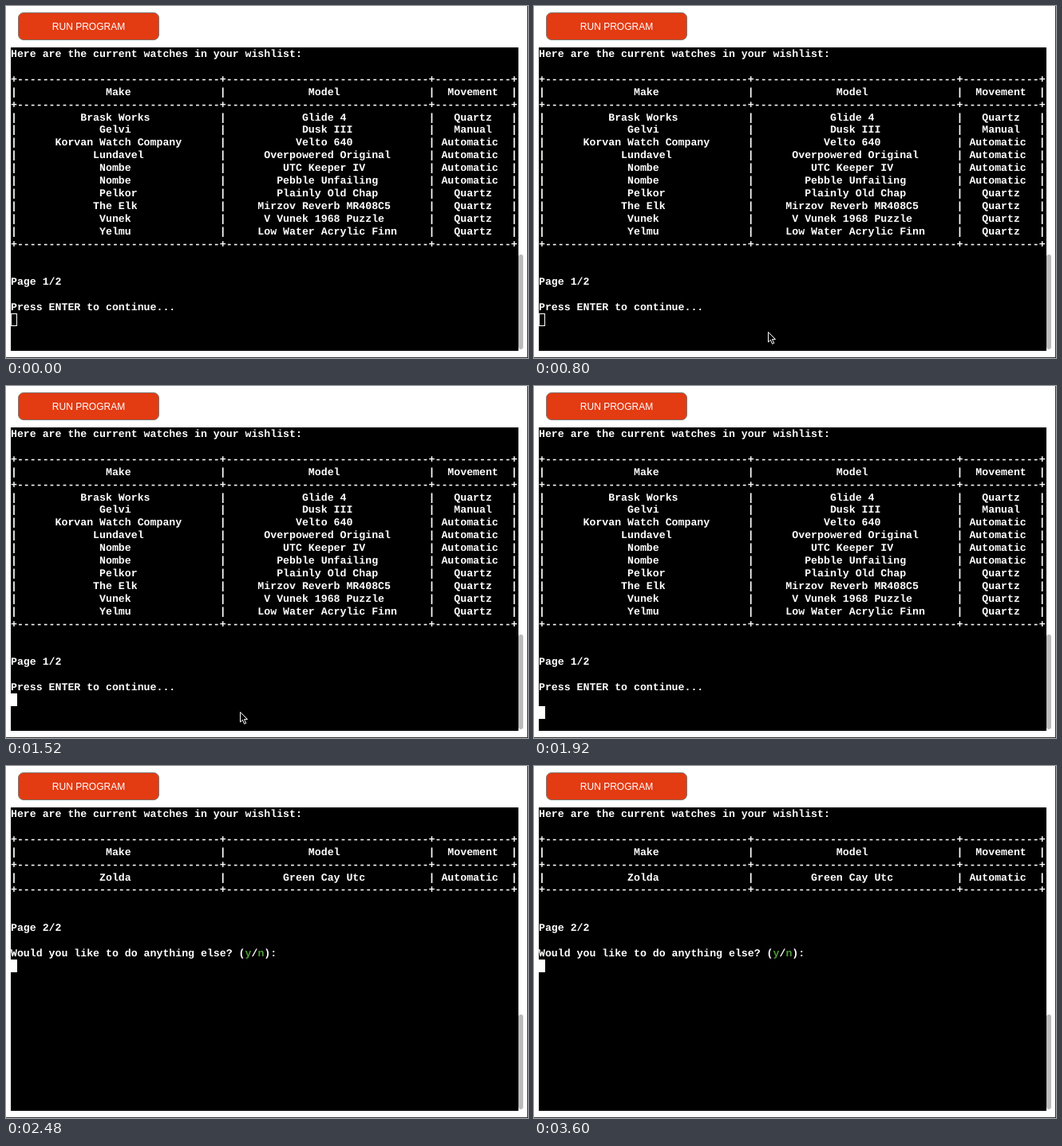
An HTML page for the animation above (4 s loop, 654 by 442 pixels).

```html
<!DOCTYPE html>
<html lang="en">
<head>
<meta charset="utf-8">
<title>Watch wishlist</title>
<style>
  html, body { margin: 0; width: 100%; height: 100%; overflow: hidden; background: #fff; }
  body * { position: absolute; box-sizing: border-box; margin: 0; }
  #stage { left: 0; top: 0; width: 654px; height: 442px; overflow: hidden;
    border: solid #333; border-width: 0 1px 1px 0; }
  #run { left: 15px; top: 8px; width: 177px; height: 35px; border: 1px solid #81766f;
    border-radius: 7px; background: #e33b12; color: #fff;
    font: 12px/34px "Liberation Sans", Arial, sans-serif; text-align: center; }
  #terminal { left: 6px; top: 52px; width: 636px; height: 381px; background: #000; overflow: hidden; }
  #screen { left: 0; top: 1px; color: #fff; white-space: pre;
    font: bold 13.22px/15.9px "Liberation Mono", "Courier New", monospace;
    text-rendering: geometricPrecision; }
  #screen b { position: static; color: #4e9a36; }
  #cursor { left: 0; width: 8px; height: 16px; border: 1px solid #fff; }
  #scrollbar { left: 642px; top: 312px; width: 6px; height: 119px; border-radius: 3px; background: #bcbcbc; }
  #pointer { left: 0; top: 0; width: 12px; height: 18px; overflow: visible; }
</style>
</head>
<body>
<div id="stage">
  <div id="run">RUN PROGRAM</div>
  <div id="terminal">
    <pre id="screen"></pre>
    <div id="cursor"></div>
  </div>
  <div id="scrollbar"></div>
  <svg id="pointer"><path d="M.5 .5V13L3.4 10.3 5.6 15.3 7.7 14.4 5.5 9.5H9.5Z" fill="#000" stroke="#fff"/></svg>
</div>
<script>
const LOOP = 4000, ROW_HEIGHT = 15.9;
const WIDTHS = [32, 32, 12];
const POINTER_IN = 400, FOCUS = 880, ENTER = 1920, NEXT_PAGE = 2000;
const $ = id => document.getElementById(id);

const watches = [
  ["Brask Works", "Glide 4", "Quartz"],
  ["Gelvi", "Dusk III", "Manual"],
  ["Korvan Watch Company", "Velto 640", "Automatic"],
  ["Lundavel", "Overpowered Original", "Automatic"],
  ["Nombe", "UTC Keeper IV", "Automatic"],
  ["Nombe", "Pebble Unfailing", "Automatic"],
  ["Pelkor", "Plainly Old Chap", "Quartz"],
  ["The Elk", "Mirzov Reverb MR408C5", "Quartz"],
  ["Vunek", "V Vunek 1968 Puzzle", "Quartz"],
  ["Yelmu", "Low Water Acrylic Finn", "Quartz"],
  ["Zolda", "Green Cay Utc", "Automatic"]
];

function center(text, width) {
  const left = Math.floor((width - text.length) / 2);
  return " ".repeat(left) + text + " ".repeat(width - left - text.length);
}

function page(number, rows, prompt) {
  const rule = "+" + WIDTHS.map(w => "-".repeat(w) + "+").join("");
  const line = cells => "|" + cells.map((c, i) => center(c, WIDTHS[i]) + "|").join("");
  return ["Here are the current watches in your wishlist:", "",
    rule, line(["Make", "Model", "Movement"]), rule, ...rows.map(line), rule,
    "", "", `Page ${number}/2`, "", prompt].join("\n");
}

const pages = [
  page(1, watches.slice(0, 10), "Press ENTER to continue..."),
  page(2, watches.slice(10), "Would you like to do anything else? (<b>y</b>/<b>n</b>):")
];
let shown = -1;

function draw(t) {
  const index = t < NEXT_PAGE ? 0 : 1;
  if (index !== shown) $("screen").innerHTML = pages[shown = index];

  const row = t < ENTER ? 21 : t < NEXT_PAGE ? 22 : 12;
  $("cursor").style.top = Math.round(row * ROW_HEIGHT) + "px";
  $("cursor").style.background = t < FOCUS ? "none" : "#fff";

  // The pointer glides in from the bottom edge and hides once a key is pressed.
  const left = 1 - Math.min(1, Math.max(0, (t - POINTER_IN) / 400));
  const ease = left * left;
  $("pointer").style.display = t >= POINTER_IN && t < ENTER ? "" : "none";
  $("pointer").style.transform = `translate(${293 + 20 * ease}px, ${409 + 30 * ease}px)`;
}

function tick() {
  draw(performance.now() % LOOP);
  requestAnimationFrame(tick);
}
tick();
</script>
</body>
</html>
```
